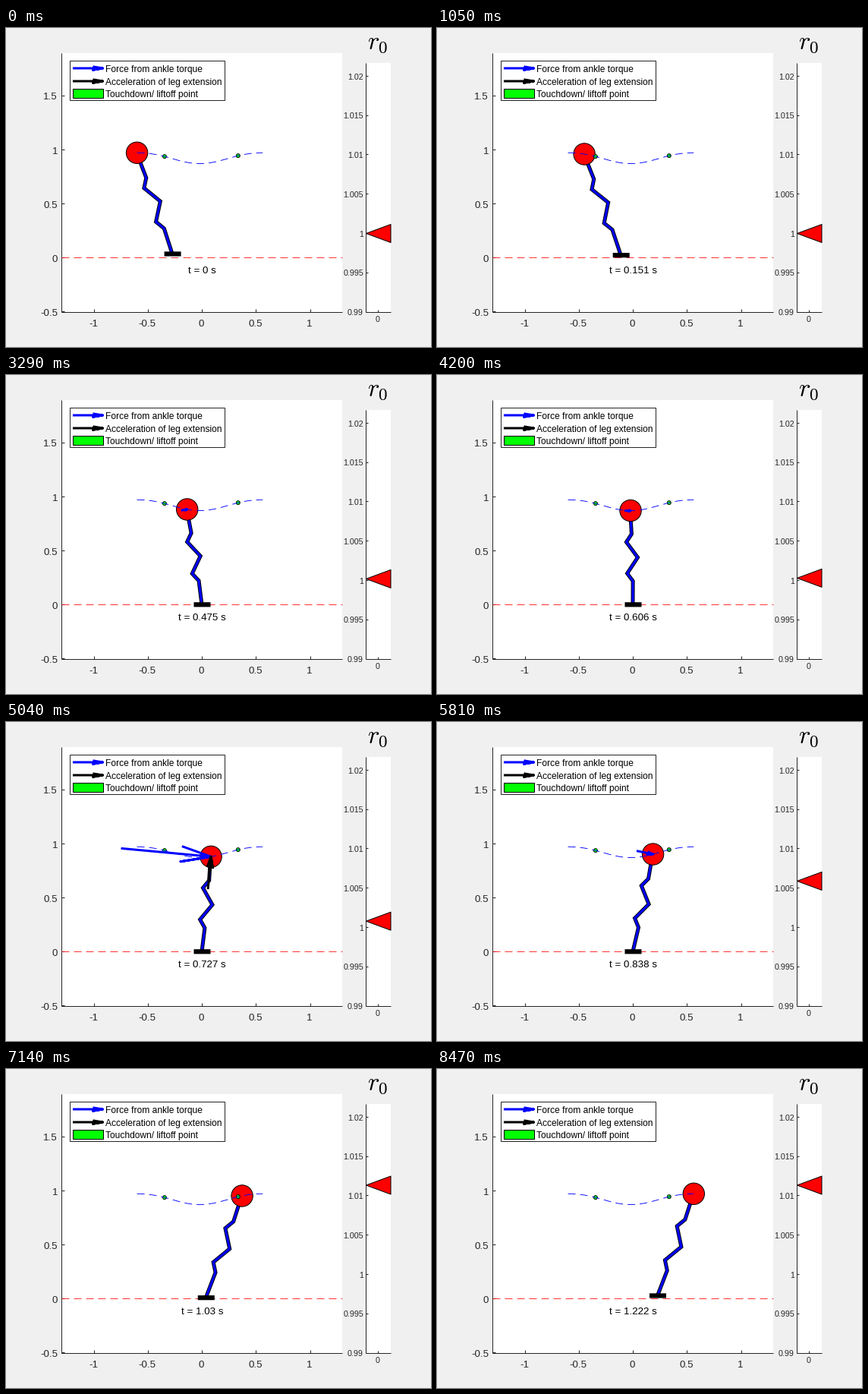
A matplotlib script that plays this animation: 560x420 px, repeating every 8540 ms.

```python
import numpy as np
import matplotlib.pyplot as plt
from matplotlib.animation import FuncAnimation
from matplotlib.patches import Circle, Polygon, Rectangle

FRAMES, INTERVAL, DT = 122, 70, 0.0101
DARK = "#262626"
PX = 72 / 70                      # points per pixel
plt.rcParams["font.family"] = "Liberation Sans"
plt.rcParams["mathtext.fontset"] = "cm"

fig = plt.figure(figsize=(8, 6), dpi=70, facecolor="#f0f0f0")
ax = fig.add_axes([0, 0, 1, 1])
ax.set(xlim=(0, 560), ylim=(420, 0))
ax.axis("off")


def sx(x):
    return 258.5 + 142.5 * x


def sy(y):
    return 302.7 - 142.4 * y


def gauge_y(r):
    return 374 - 10350 * (r - 0.99)


def line(xs, ys, color=DARK, lw=1.0, z=2, **kw):
    kw.setdefault("solid_capstyle", "butt")
    return ax.plot(xs, ys, color=color, lw=lw * PX, zorder=z, **kw)[0]


def label(x, y, s, size, ha="center", color=DARK, z=2):
    return ax.text(x, y, s, fontsize=size * PX, ha=ha, va="baseline",
                   color=color, zorder=z)


def box(x0, y0, x1, y1, fc, ec="none", z=1):
    return ax.add_patch(Rectangle((x0, y0), x1 - x0, y1 - y0, fc=fc, ec=ec,
                                  lw=0 if ec == "none" else PX, zorder=z))


def smooth(points):
    """Monotone cubic through the points, held constant outside them."""
    t, v = np.array(points, float).T
    h = np.diff(t)
    s = np.diff(v) / h
    a, b = s[:-1], s[1:]
    same = a * b > 0
    mid = np.where(same, 2 * a * b / np.where(same, a + b, 1), 0)
    m = np.concatenate([[s[0]], mid, [s[-1]]])

    def f(q):
        q = np.clip(q, t[0], t[-1])
        i = np.clip(np.searchsorted(t, q, side="right") - 1, 0, len(h) - 1)
        u = (q - t[i]) / h[i]
        w = 1 - u
        return ((1 + 2 * u) * w * w * v[i] + u * u * (3 - 2 * u) * v[i + 1]
                + h[i] * u * w * (w * m[i] - u * m[i + 1]))
    return f


# Motion, in steps of DT
X0, X_TD, X_LO, X1 = -0.603, -0.348, 0.332, 0.56
Y_TOP, Y_TD, Y_LO = 0.972, 0.938, 0.945
body_x = smooth([(0, X0), (30, -0.302), (47, -0.139), (72, 0.081),
                 (83, 0.183), (102, 0.369), (121, X1)])
rest_len = smooth([(26, 1), (30, 1.00002), (47, 1.0002), (60, 1.0003),
                   (66, 1.0004), (72, 1.0008), (78, 1.0031), (83, 1.0059),
                   (90, 1.0097), (98, 1.01135)])
ankle = smooth([(25, 27), (30, 24), (40, 14), (47, 8), (56, 1), (65, 30),
                (72, 119), (74, 125), (79, 100), (83, 22), (85, 0)])
thrust = smooth([(60, 0), (66, 12), (72, 43), (76, 64), (80, 45), (83, 0),
                 (91, -59), (98, -73)])


def body_y(x):
    down, up = Y_TOP - Y_TD, Y_TOP - Y_LO
    if x < X_TD:
        return Y_TOP - down * ((x - X0) / (X_TD - X0)) ** 2
    if x > X_LO:
        return Y_TOP - up * ((X1 - x) / (X1 - X_LO)) ** 2
    span = X_LO - X_TD
    s = (x - X_TD) / span
    w = 1 - s
    m0, m1 = -2 * down / (X_TD - X0), 2 * up / (X1 - X_LO)
    return ((1 + 2 * s) * w * w * Y_TD + s * s * (3 - 2 * s) * Y_LO
            + span * s * w * (w * m0 - s * m1) - 0.0265 * (4 * s * w) ** 2)


def foot_pos(x, y):
    if x < X_TD:
        return x + 0.33 + 0.018 * (x - X0) / (X_TD - X0), y - Y_TD
    if x > X_LO:
        return x - X_LO, y - Y_LO
    return 0.0, 0.0


def arrow_path(tip, unit, length, spread=0.085):
    """Shaft and two open barbs, ending at tip."""
    tip, unit = np.array(tip, float), np.array(unit, float)
    side = np.array([-unit[1], unit[0]]) * spread * length
    back = tip - unit * 0.33 * length
    return np.array([tip - unit * length, tip, back + side, tip, back - side]).T


def arrow(color, z):
    return line([], [], color, 3, z, solid_joinstyle="round")


# Main axes; whole numbers snap straight lines to pixel centres
box(73, 33, 443, 374, "white")
line([73, 73], [33, 374], z=1.5)
line([73, 443], [374, 374], z=1.5)
for v in (-1, -0.5, 0, 0.5, 1):
    line([int(sx(v))] * 2, [374, 370])
    label(sx(v) - 1, 393, f"{v:g}", 13.33)
for v in (-0.5, 0, 0.5, 1, 1.5):
    line([73, 77], [int(sy(v))] * 2)
    label(68, sy(v) + 5.3, f"{v:g}", 13.33, "right")
line([73, 443], [302, 302], "red", 0.8, 2, dashes=(12.5, 7.5))

# Gauge axes
box(474, 46, 507, 374, "white")
line([474, 474], [46, 374], z=1.5)
line([474, 507], [374, 374], z=1.5)
line([490, 490], [374, 371])
label(490, 387, "0", 10.67)
for i in range(7):
    r = 0.99 + 0.005 * i
    line([474, 477], [int(gauge_y(r))] * 2)
    label(471, gauge_y(r) + 4.2, f"{r:.4g}", 10.67, "right")
label(489.5, 27, "$r_0$", 33, color="black")

# Legend
box(84, 43, 288, 95, "white", DARK, 8)
for y, color in ((53, "blue"), (70, "black")):
    arrow(color, 9).set_data(*arrow_path((127.5, y), (1, 0), 39.5, 0.055))
box(88, 80, 128, 92, "lime", "black", 9)
for y, s in ((58, "Force from ankle torque"),
             (75, "Acceleration of leg extension"),
             (91, "Touchdown/ liftoff point")):
    label(131, y, s, 12, "left", "black", 9)

# Path of the body and contact points
xs = np.linspace(X0, X1, 200)
line(sx(xs), sy(np.array([body_y(x) for x in xs])), "blue", 0.9, 5,
     dashes=(11.1, 6.7))
for x, y in ((X_TD, Y_TD), (X_LO, Y_LO)):
    ax.add_patch(Circle((sx(x), sy(y)), 2.5, fc="lime", ec="black",
                        lw=0.9 * PX, zorder=4.5))

# Moving parts
FOOT_W, FOOT_H = 22, 6.2
leg_edge = line([], [], "black", 5, 3, solid_joinstyle="miter")
leg_core = line([], [], "blue", 3.1, 3.1, solid_joinstyle="miter")
foot = box(0, 0, FOOT_W, FOOT_H, "black", z=3.5)
foot.set_snap(False)
ball = ax.add_patch(Circle((0, 0), 14.2, fc="red", ec="black", lw=PX, zorder=4))
blue_arrow = arrow("blue", 6)
black_arrow = arrow("black", 6.5)
clock = label(258.8, 323, "", 13.33, color="black", z=7)
pointer = ax.add_patch(Polygon([(0, 0)] * 3, fc="red", ec="black", lw=PX,
                               joinstyle="round", zorder=3))

ALONG = np.array([0, 1 / 4, 1 / 3, 1 / 2, 2 / 3, 3 / 4, 1])
ACROSS = np.array([0, 1, -6.2, 8.2, -6.2, 1, 0])


def update(k):
    x = float(body_x(k))
    y = body_y(x)
    fx, fy = foot_pos(x, y)
    top = np.array([sx(x), sy(y)])
    end = np.array([sx(fx), sy(fy) - 0.4])
    length = np.hypot(*(end - top))
    down = (end - top) / length
    side = np.array([down[1], -down[0]])

    pts = top + np.outer(ALONG * length, down) + np.outer(ACROSS, side)
    pts[:, 0] -= 0.5
    leg_edge.set_data(*pts.T)
    leg_core.set_data(*pts.T)
    foot.set_xy((end[0] - FOOT_W / 2, end[1] - FOOT_H / 2))
    ball.center = tuple(top)

    stance = X_TD <= x <= X_LO
    push, lift = float(ankle(k)), float(thrust(k))
    blue_arrow.set_visible(stance and push > 0.8)
    blue_arrow.set_data(*arrow_path(top, side, push))
    black_arrow.set_visible(stance and abs(lift) > 0.8)
    black_arrow.set_data(*arrow_path(top, -down * np.sign(lift), abs(lift)))

    g = gauge_y(float(rest_len(k)))
    pointer.set_xy([(474.5, g), (507, g - 12), (507, g + 12)])
    clock.set_text(f"t = {round(k * DT, 3):g} s")
    return ()


anim = FuncAnimation(fig, update, frames=FRAMES, interval=INTERVAL,
                     init_func=lambda: update(0), repeat=True, repeat_delay=0)
plt.show()
```
